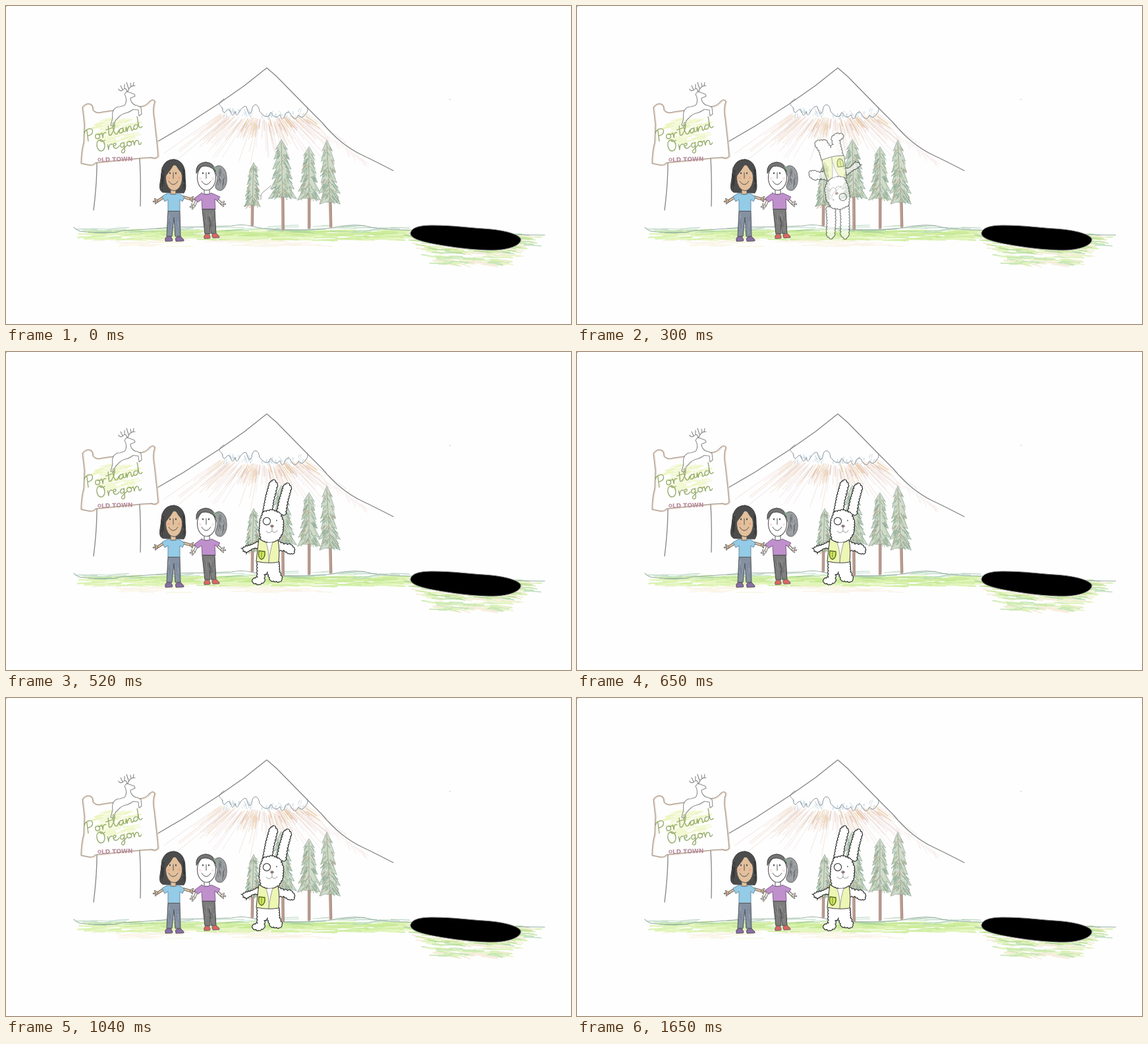
Write an HTML page that moves like this. It is 858 px wide and 483 px high and loops after 1690 ms.

```html
<!DOCTYPE html>
<html lang="en">
<head>
<meta charset="utf-8">
<title>Rabbit spins into a crayon landscape</title>
<style>
  html, body { margin: 0; width: 100%; height: 100%; overflow: hidden; background: #fefefe; }
  svg { display: block; width: 858px; height: 483px; }
  path, ellipse, circle { stroke-linecap: round; stroke-linejoin: round; }
</style>
</head>
<body>
<svg id="stage" viewBox="0 0 858 483"></svg>
<script>
let seed = 7;
const random = () => {
  seed = (seed * 1664525 + 1013904223) >>> 0;
  return seed / 4294967296;
};
const between = (a, b) => a + (b - a) * random();
const pick = list => list[Math.floor(random() * list.length)];

const path = (d, stroke = 'none', width = 1, fill = 'none', extra = '') =>
  `<path d="${d}" stroke="${stroke}" stroke-width="${width}" fill="${fill}" ${extra}/>`;
const oval = (x, y, rx, ry, fill, stroke = 'none', width = 1) =>
  `<ellipse cx="${x}" cy="${y}" rx="${rx}" ry="${ry}" fill="${fill}" stroke="${stroke}" stroke-width="${width}"/>`;

// Many crayon strokes; line() returns [x, y, dx, dy].
function crayon(count, colors, width, opacity, line) {
  let out = '';
  for (let i = 0; i < count; i++) {
    const [x, y, dx, dy] = line().map(v => v.toFixed(1));
    out += path(`M${x} ${y}q${dx / 2} ${dy / 2 - 0.6} ${dx} ${dy}`, pick(colors), width);
  }
  return `<g opacity="${opacity}">${out}</g>`;
}

// Closed outline made of small outward bumps.
function fluffy(points) {
  let d = `M${points[0]}`;
  points.forEach(([x, y], i) => {
    const [nx, ny] = points[(i + 1) % points.length];
    const length = Math.hypot(nx - x, ny - y), n = Math.max(1, Math.round(length / 4.5));
    const r = length / n * 0.6, sx = (nx - x) / n, sy = (ny - y) / n;
    for (let j = 0; j < n; j++) d += `a${r} ${r} 0 0 1 ${sx} ${sy}`;
  });
  return path(d + 'Z', '#2a2a2a', 1.2, '#fff');
}

function mountain() {
  const fan = (s, reach) => {
    const dy = between(8, reach), slant = (s * 2 - 1) * 1.45;
    return [324 + s * 134, 161 + 9 * Math.sin(s * 3.1) + between(0, 12), slant * dy, dy];
  };
  const snow = 'M331 141C322 147 323 150 328 154Q330 166 334 160T341 160Q344 172 348 160Q350 172 355 159' +
    'Q362 150 365 153Q369 170 373 160Q374 149 380 150Q384 152 385 160Q394 172 400 166Q402 157 405 166' +
    'Q411 172 416 165Q420 179 424 164Q430 157 433 166Q439 177 444 166Q450 173 455 164Q460 159 457 153';
  return crayon(75, ['#f0dfd3', '#f3e3df', '#eee2de', '#efe8ec'], 1.1, .7, () => fan(random(), 60)) +
    crayon(55, ['#e6c8ac', '#ebd0c3', '#e4cdc8', '#f0d9b4'], 1, .65, () => fan(random(), 34)) +
    crayon(38, ['#e0b488', '#dcb8a9', '#eac794'], 1.1, .65, () => fan(between(.3, 1), 18)) +
    crayon(35, ['#f6e6e4', '#f8eee9', '#f3e9e9'], 1, .7, () => {
      const x = between(455, 545);
      return [x, 175 + (x - 455) * .67, between(4, 14), between(6, 16)];
    }) +
    crayon(45, ['#b3ccda', '#a0bacc', '#c6d9e3'], 1.2, .6, () => {
      const x = between(324, 452);
      return [x, 158 + 6 * Math.sin((x - 320) / 45) + between(-6, 5), between(-2, 3), between(2, 6)];
    }) +
    path(snow, '#8a949b', 1) +
    path('M230 206L271 182L322 149L362 121L396 94L411 107L459 156L480 177Q495 195 510 207T540 226T588 250', '#808080', 1.2);
}

function sign() {
  const board = 'M116 154Q121 147 128 149Q132 151 132 158Q137 164 146 161L208 152Q214 150 218 145Q223 140 226 145' +
    'Q222 156 225 171L229 207L231 228Q227 233 221 230L205 231L136 238Q132 243 124 241L114 239Q114 222 118 207L119 180Z';
  const portland = 'M3 0L5-17M0-13C4-20 15-19 13-13C12-9 8-8 5-8M19-7C14-8 14 0 18 0C23 0 23-7 19-7' +
    'C21-5 25-6 26-7L26 0C27-5 29-8 32-6M38-15L36-2C36 0 39 0 41-3C47-8 50-18 47-18C44-18 43 0 47 0C50 0 51-4 52-5' +
    'M33-10L43-11M58-6C53-9 50 0 54 0C58 0 59-5 59-7C58 0 59 0 62-1L64-7L64 0C65-5 70-9 71-5L71 0C72 1 74-1 75-2' +
    'M81-6C75-9 73 0 77 0C82 0 84-10 84-18L83-3C83 0 86 0 88-2';
  const oregon = 'M6-17C-3-17-2 0 5 0C13 0 14-16 6-17C5-14 9-13 13-15M16-8L16 0C17-6 20-9 23-7' +
    'M24-4C29-4 30-8 27-8C23-8 23 0 28 0C30 0 32-2 33-3M40-6C35-9 33 0 37 0C40 0 41-4 41-7L40 6C39 10 34 9 35 6' +
    'C36 3 42 1 45-2M49-7C44-8 44 0 48 0C53 0 53-7 49-7C50-5 53-5 55-7L56 0C57-6 62-9 63-4L63 0C64 1 66 0 67-2';
  const deer = 'M180 151C184 146 183 139 180 134L183 130L187 131L195 134L196 137L189 140C189 146 194 151 199 151' +
    'L205 154L206 164L202 167L201 158L193 157C187 163 178 162 173 167L166 174L163 183L159 181L162 170C160 161 164 153 173 153Z';
  const antlers = 'M184 130Q182 122 177 128Q172 130 171 126M177 127L174 121M180 125L180 119' +
    'M185 130Q187 121 196 121M186 125L183 116M190 122L189 117M193 121L194 116';
  return path(board, '#ecd3bd', 2.6, '#fff', 'transform="translate(1 .5)" opacity=".75"') +
    crayon(80, ['#eef6c3', '#f1f7d0', '#e8f2ae'], 2, .75, () => {
      const a = between(0, 6.28), r = Math.sqrt(random());
      return [160 + r * 32 * Math.cos(a), 192 + r * 21 * Math.sin(a), between(8, 20), -4];
    }) +
    path(board, '#9c9792', 1.1) +
    path('M138 239Q138 270 133 310M203 232Q205 265 204 304', '#858585', 1.3) +
    path(deer, '#8f8f8f', 1.1, '#fff') + path(antlers, '#858585', 1.1) +
    path(portland, '#97ad6e', 1.4, 'none', 'transform="translate(122 206) rotate(-14)" aria-label="Portland"') +
    path(oregon, '#97ad6e', 1.4, 'none', 'transform="translate(140 221) rotate(-10)" aria-label="Oregon"') +
    `<text transform="translate(139 237) rotate(-2)" font-family="'DejaVu Sans', sans-serif" font-weight="bold"
      font-size="9" fill="#b58a98"><tspan font-size="7" dy="-1">O</tspan><tspan dy="1">LD TOWN</tspan></text>`;
}

function tree(x, top, bottom, ground, half, lean = 0) {
  const h = bottom - top, tiers = 6, left = [], right = [];
  const center = t => x + lean * t;
  for (let i = 1; i <= tiers; i++) {
    const t = i / tiers, w = half * (.35 + .6 * t) * between(.85, 1.1), y = top + h * t;
    left.push(`${center(t) - w} ${y}L${center(t) - w * .55} ${y - 3}`);
    right.unshift(`${center(t) + w * .55} ${y - 3}L${center(t) + w} ${y}`);
  }
  return path(`M${center(1)} ${bottom - 8}L${center(1.2)} ${ground}`, '#bb9c90', 4, 'none', 'stroke-linecap="butt"') +
    path(`M${center(1) + 2} ${bottom - 8}L${center(1.2) + 2} ${ground}`, '#8b746d', .8) +
    path(`M${x} ${top}L${left.join('L')}L${right.join('L')}Z`, '#849d8e', .9, '#c4d4c0', 'opacity=".8"') +
    crayon(half * 6, ['#7fa38d', '#93b397', '#a1ab8d', '#739584', '#b5c69c', '#b5a087'], 1.1, .75, () => {
      const t = Math.sqrt(random()), side = pick([-1, 1]), w = half * (.3 + .55 * t);
      return [center(t) + side * w * between(0, .75), top + h * t * .95, side * between(2, 5), between(3, 7)];
    }) +
    path(`M${x} ${top + 4}L${center(1)} ${bottom - 6}`, '#9d8a78', 1.2, 'none', 'opacity=".6"');
}

function ground() {
  const line = 'M103 336Q108 343 122 343Q150 347 180 341Q220 339 250 336Q300 336 343 334Q357 331 372 334' +
    'Q392 340 420 340Q475 341 500 336Q530 330 550 335T606 340Q690 344 740 346T818 348';
  const band = (x1, x2, y1, y2) => () => [between(x1, x2), between(y1, y2), between(18, 48), between(-3, 2)];
  const patch = () => {
    const v = random() ** 1.2, x = between(600 + 40 * v, 790 - 40 * v);
    return [x, 346 + v * 46, between(14, 30), between(-1, 5)];
  };
  return crayon(45, ['#faeee0', '#f9f2e4', '#f7f3d5'], 1.5, .7, band(130, 490, 355, 366)) +
    crayon(260, ['#cbee92', '#d6f2a0', '#bfe87f', '#e0f3ab'], 1.9, .7, band(108, 585, 341, 356)) +
    crayon(60, ['#b4e07a', '#c3e88a'], 1.6, .5, band(180, 580, 341, 349)) +
    crayon(45, ['#98cbab', '#a9d1ad', '#89ba9a'], 1.2, .6, band(104, 585, 335, 344)) +
    crayon(200, ['#c4e98c', '#d2efa0', '#e2f0b4', '#f5e6d0', '#b2dd98'], 1.8, .7, patch) +
    crayon(70, ['#9fd09f', '#a9d488', '#b9e47c'], 1.5, .65, () =>
      [between(598, 788), between(345, 374), between(12, 28), between(0, 3)]) +
    path(line, '#93ac9d', 1.1);
}

const hole = () => path('M614 345C616 336 628 333 648 333C680 333 705 337 725 338C760 340 782 348 782 355' +
  'C781 365 760 371 738 371C705 371 660 364 638 359C622 355 614 351 614 345Z', '#999', 1, '#000');

const face = (x, y) =>
  oval(x - 5, y - 6, 1, 1.4, '#444') + oval(x + 4, y - 6, 1, 1.4, '#444') +
  path(`M${x} ${y - 7}v9`, '#555', 1) + path(`M${x - 7} ${y + 6}q7 11 14 0`, '#555', 1);

function limb(d, skin) {
  return path(d, '#555', 4) + path(d, skin, 2.4);
}

function hand(x, y, side, skin) {
  const d = `M${x} ${y}l${4 * side} -3M${x} ${y}l${6 * side} 1M${x} ${y}l${3 * side} 4`;
  return path(d, '#555', 2.4) + path(d, skin, 1.2);
}

function friends() {
  const ink = '#555', tan = '#e2c09c', pale = '#f7ece5';
  const hair = 'M255 233C243 233 237 241 236 254C235 268 230 279 238 283L270 284C275 277 272 268 272 257C272 243 266 234 255 233Z';
  const first = path(hair, '#3a3a3a', 1, '#4c4c4c') +
    crayon(40, ['#333', '#6c6c6c', '#2b2b2b'], 1, .7, () => {
      const side = pick([-1, 1]);
      return [254 + side * between(14, 17), between(245, 268), side * between(-1, 2), between(7, 14)];
    }) +
    limb('M240 290L229 297', tan) + limb('M269 290L280 293', tan) +
    hand(230, 296, -1, tan) + hand(280, 293, 1, tan) +
    path('M250 276V286H258V276', ink, 1, tan) +
    oval(255, 261, 12.5, 19.5, tan, ink, 1) +
    path('M242 259Q250 250 256 239Q261 248 268 256Q267 238 255 238Q243 240 242 259Z', 'none', 1, '#4c4c4c') +
    oval(247, 261, 2.2, 2.2, '#e8ab8f') + oval(263, 261, 2.2, 2.2, '#e8ab8f') + face(254, 260) +
    path('M246 284L237 289L241 297L246 294L246 312H264L264 294L268 297L271 290L262 284Q254 289 246 284Z', '#6b8da2', 1, '#94cbe6') +
    path('M246 312L244 350H252L255 321L257 350H265L264 312Z', ink, 1, '#8491a3') +
    path('M242 357Q240 349 250 350Q255 357 252 357ZM258 357Q255 350 265 350Q273 357 269 357Z', ink, 1, '#886da5') +
    crayon(25, ['#6b7b91', '#a3adba'], 1, .6, () => [pick([248, 261]) + between(-2, 2), between(316, 341), 0, 7]);
  const second = path('M316 246C325 237 335 247 335 260C336 269 333 277 327 280C320 281 316 276 319 270C323 260 319 254 316 251Z', '#666', 1, '#9a9ea2') +
    crayon(28, ['#6a6a6a', '#b0b4b8', '#5a5a5a'], 1, .7, () => [between(321, 331), between(247, 270), between(-1, 2), 7]) +
    limb('M291 292L286 303', pale) + limb('M318 291L328 301', pale) +
    hand(286, 304, -1, pale) + hand(327, 300, 1, pale) +
    path('M301 276V286H309V276', ink, 1, '#fff') +
    oval(304.5, 260.5, 14, 19.5, '#fff', ink, 1.1) +
    path('M289 254Q287 239 303 237Q317 238 318 252L314 247Q303 240 295 245Z', '#444', 1, '#747474') +
    path('M316 244l4 7', '#8ab08b', 2) + face(304, 260) +
    oval(295, 262, 2, 2, '#fbe7e3') + oval(314, 262, 2, 2, '#fbe7e3') +
    path('M297 284L286 292L291 298L297 294L298 309H318L317 293L321 296L325 290L312 284Q304 289 297 284Z', '#80628c', 1, '#bf90cc') +
    path('M298 309L302 346H310L309 320L312 346H319L317 309Z', '#444', 1, '#7c7c7c') +
    path('M301 353Q299 346 308 346Q312 353 309 353ZM314 352Q310 346 319 345Q327 352 323 352Z', '#666', 1, '#dc6560') +
    crayon(25, ['#5d5d5d', '#979797'], 1, .6, () => [between(301, 316), between(311, 337), between(0, 2), 7]);
  return first + second;
}

function rabbit() {
  const ear = (x, y, h) => fluffy([[x, y], [x + 5, y - h * .5], [x + 11, y - h * .92], [x + 17, y - h],
    [x + 22, y - h * .86], [x + 16, y - h * .4], [x + 13, y]]);
  return ear(390, 246, 52) + ear(411, 247, 48) +
    fluffy([[384, 286], [372, 292], [364, 294], [357, 298], [360, 303], [365, 306], [376, 299], [385, 299]]) +
    fluffy([[413, 288], [422, 292], [433, 293], [438, 299], [437, 306], [430, 306], [422, 301], [412, 301]]) +
    fluffy([[382, 318], [414, 318], [415, 334], [419, 344], [415, 349], [402, 347], [397, 334], [392, 338],
      [392, 349], [384, 353], [375, 350], [375, 345], [382, 342]]) +
    fluffy([[391, 243], [404, 240], [416, 245], [421, 258], [420, 274], [413, 286], [401, 290], [388, 286], [385, 272], [386, 256]]) +
    path('M384 283Q382 300 380 318Q398 322 414 319Q416 300 413 285Q407 290 399 290Q391 289 384 283Z', '#444', 1.1, '#eef6b4') +
    path('M395 290Q400 302 399 320Q401 302 405 289Z', '#888', .8, '#fff') +
    path('M384 302L393 303Q394 313 388 315Q382 313 384 302Z', '#536b1e', 1.4, '#d2e85f') +
    path('M388 304v8', '#758a34', 1) +
    `<circle cx="396" cy="257" r="5.6" fill="#fff" stroke="#444" stroke-width="1.2"/>` +
    oval(411, 256, .9, 1.2, '#777') +
    oval(404, 264.5, 2.2, 1.8, '#a5716b', '#666', .7) +
    path('M404 267v5Q399 277 395 272M404 272Q409 277 412 271', '#999', 1);
}

document.getElementById('stage').innerHTML =
  oval(0, 0, 1.2, 1.2, '#777') + oval(674, 142, .7, .7, '#aaa') +
  mountain() + sign() + ground() +
  path('M387 294Q386 284 394 280L402 273', '#999992', 1) +
  tree(376, 238, 305, 333, 13, -2) + tree(418, 203, 293, 339, 21, 2) +
  tree(460, 214, 295, 337, 18) + tree(487, 204, 301, 335, 18, 5) +
  hole() + friends() + `<g id="rabbit">${rabbit()}</g>`;

const LOOP = 1690, STEP = LOOP / 39, SPIN_STEPS = 12;
const hero = document.getElementById('rabbit');

function draw() {
  const time = performance.now() % LOOP;
  const p = Math.min(1, Math.floor((time + 4) / STEP) / SPIN_STEPS);
  const turn = -360 * p * (.9 + .1 * p ** 3);
  hero.setAttribute('opacity', p);
  hero.setAttribute('transform', `rotate(${turn} 398 274)`);
  requestAnimationFrame(draw);
}
draw();
</script>
</body>
</html>
```
